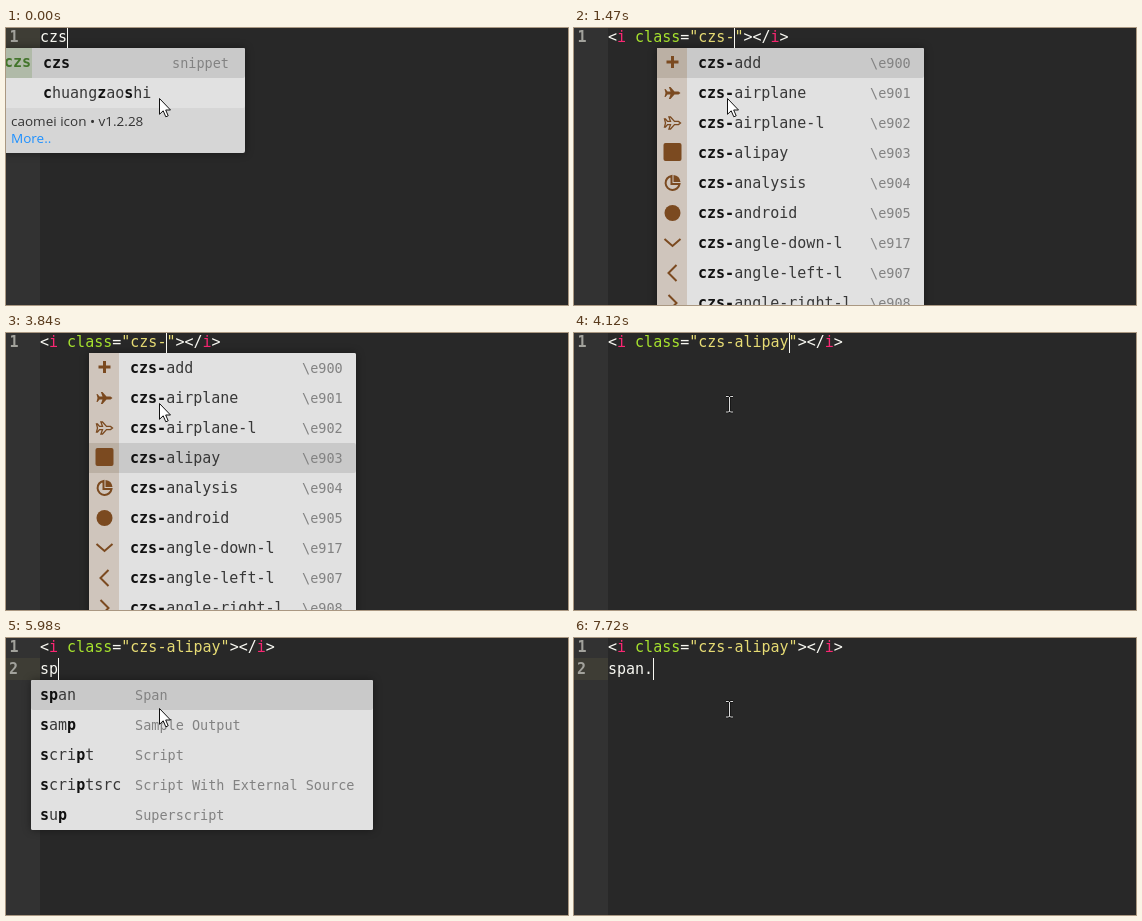
An HTML page that plays this animation: 562x277 px, repeating every 8000 ms.

```html
<!DOCTYPE html>
<html lang="en">
<head>
<meta charset="utf-8">
<title>Icon completion in an editor</title>
<style>
html, body { margin: 0; width: 100%; height: 100%; overflow: hidden; background: #282828; }
svg { display: block; width: 562px; height: 277px; }
text { font: 15px "DejaVu Sans Mono", monospace; white-space: pre; }
.hint { font-size: 13.5px; fill: #828282; }
.bold { font-weight: bold; }
.info { font: 13.5px "Open Sans", "Noto Sans", sans-serif; }
.box { filter: drop-shadow(0 0 4px rgba(0,0,0,.4)); }
</style>
</head>
<body>
<svg id="stage" viewBox="0 0 562 277"></svg>
<script>
const stage = document.getElementById('stage');
const LOOP = 8000, LEFT = 34, ADVANCE = 9.03;
const WHITE = '#f8f8f2', PINK = '#f92672', GREEN = '#a6e22e', YELLOW = '#e6db74', BROWN = '#7b4a20';

const esc = s => s.replace(/&/g, '&amp;').replace(/</g, '&lt;');
const rect = (x, y, w, h, fill, extra = '') =>
  `<rect x="${x}" y="${y}" width="${w}" height="${h}" fill="${fill}" ${extra}/>`;
const text = (x, y, s, fill, cls = '') => `<text x="${x}" y="${y}" fill="${fill}" class="${cls}">${s}</text>`;
const span = (s, fill) => `<tspan fill="${fill}">${esc(s)}</tspan>`;
const line = (d, w = 2) => `<path d="${d}" fill="none" stroke="${BROWN}" stroke-width="${w}"/>`;

const tag = cls => span('<', WHITE) + span('i', PINK) + span(' class', GREEN) + span('=', WHITE) +
  span(`"${cls}"`, YELLOW) + span('></', WHITE) + span('i', PINK) + span('>', WHITE);

// Label with the typed letters in bold
function label(word, typed) {
  let n = 0;
  return [...word].map(c => c === typed[n] ? (n++, `<tspan class="bold" fill="#111">${c}</tspan>`) : c).join('');
}

// Icons are centred on the origin
const plane = 'M8 0L6-1.6H2L-2-6H-3.6L-2-1.6H-5L-7-4H-8L-7 0L-8 4H-7L-5 1.6H-2L-3.6 6H-2L2 1.6H6Z';
const icons = [
  line('M-6-1H6M0-7V5', 3),
  `<path d="${plane}" fill="${BROWN}"/>`,
  line(plane, 1.3),
  rect(-9, -10, 18, 18, BROWN, 'rx="2"'),
  line('M-1-7A7 7 0 1 0 7 1H-1Z', 2) + `<path d="M1-8A8 8 0 0 1 8-1H1Z" fill="${BROWN}"/>`,
  `<circle r="8" fill="${BROWN}"/>`,
  line('M-8-4L0 3L8-4'),
  line('M4-8L-4 0L4 8'),
  line('M-4-8L4 0L-4 8')
];

function popup({ x, y, right, rows, typed, hintX, sel = 0, kind, info = 0 }) {
  const w = right - x, h = rows.length * 30;
  let out = `<g class="box">` + rect(x, y, w, h + info, info ? '#d6d6d6' : '#e1e1e1', 'rx="2"') + '</g>';
  out += rect(x, y, w, h, '#e1e1e1', 'rx="2"') + rect(x, y + sel * 30, w, 30, '#c9c9c9', 'rx="2"');
  if (kind === 'icon') out += rect(x, y, 30, h, '#cfc5bc') + rect(x, y + sel * 30, 30, 30, '#bbb0a4');
  if (kind === 'snippet') out += rect(x, y, 30, 30, '#b0baa8') + text(-2, y + 19, 'czs', '#43752b', 'bold');
  rows.forEach(([word, hint], i) => {
    const base = y + i * 30 + 20;
    if (kind === 'icon') out += `<g transform="translate(98.5 ${base - 5})">${icons[i]}</g>`;
    out += text(x + (kind ? 41 : 9), base, label(word, typed), '#383838') + text(hintX, base, hint, '#828282', 'hint');
  });
  return out;
}

const pairs = s => s.split('|').map(p => p.split(':'));
const prefix = {
  x: -4, y: 20, right: 239, typed: 'czs', hintX: 166, kind: 'snippet', info: 45,
  rows: [['czs', 'snippet'], ['chuangzaoshi', '']]
};
const iconRows = pairs('add:0|airplane:1|airplane-l:2|alipay:3|analysis:4|android:5|angle-down-l:17|angle-left-l:7|angle-right-l:8')
  .map(([name, n]) => ['czs-' + name, '\\e9' + n.padStart(2, '0')]);
const iconList = sel => ({ x: 83, y: 20, right: 350, rows: iconRows, typed: 'czs-', hintX: 296, kind: 'icon', sel });
const tagList = (typed, rows, right = 367, hintX = 129) => ({ x: 25, y: 42, right, rows: pairs(rows), typed, hintX });

const scripts = 'samp:Sample Output|script:Script|scriptsrc:Script With External Source|';
const manyTags = scripts + 'section:Section|select:Select|small:Small|source:Source|span:Span';
const someTags = 'span:Span|' + scripts + 'sup:Superscript';

const start = { first: span('czs', WHITE), col: 3, menu: prefix, lit: 1 };
const pick = sel => ({ first: tag('czs-'), col: 14, menu: iconList(sel) });
const done = { first: tag('czs-alipay'), col: 20 };
const second = (typed, menu) => ({ first: done.first, second: typed, col: typed.length, menu, lit: 1 });
const word = second('span', tagList('span', 'span:Span', 258, 84));
const dotted = second('span.');

// time, scene, caret shown
const steps = [
  [0, start, 1], [270, start, 0], [700, start, 1], [1070, start, 0],
  [1470, pick(0), 1], [1750, pick(0), 0], [2160, pick(0), 1], [2590, pick(0), 0], [3020, pick(0), 1],
  [3420, pick(1), 0], [3570, pick(2), 0], [3840, pick(3), 1],
  [4120, done, 1], [4530, done, 0], [4840, done, 1],
  [5270, second(''), 1], [5580, second(''), 0],
  [5860, second('s', tagList('s', manyTags)), 1],
  [5980, second('sp', tagList('sp', someTags)), 1],
  [6100, second('spa', tagList('spa', 'span:Span', 258, 84)), 1],
  [6220, word, 1], [6520, word, 0], [6890, word, 1],
  [7020, dotted, 1], [7290, dotted, 0], [7720, dotted, 1]
];

const arrow = '<path d="M153.5 70.5V86.3L157.2 82.8L159.8 88.8L162.2 87.8L159.7 82H164.5Z" fill="#fff" stroke="#111"/>';
const beamPath = 'M152 63.5H154.5L155.5 64.5L156.5 63.5H159M155.5 64V78.5M152 79H154.5L155.5 78L156.5 79H159';
const beam = `<path d="${beamPath}" fill="none" stroke="#111" stroke-width="2.4"/>` +
  `<path d="${beamPath}" fill="none" stroke="#ddd"/>`;

function draw([, s, caret]) {
  const below = s.second !== undefined, top = below ? 20 : -2;
  let out = rect(0, 0, 562, 277, '#282828') + rect(0, 0, LEFT, 277, '#323232');
  if (s.lit) out += rect(0, top, LEFT, 22, '#3e3d35');
  out += text(3.5, 14, '1', '#a2a29c', 'bold') + text(LEFT, 14, s.first, WHITE);
  if (below) out += text(3, 36, '2', '#a2a29c', 'bold') + text(LEFT, 36, s.second, WHITE);
  if (s.menu) out += popup(s.menu);
  if (s.menu === prefix)
    out += text(5, 98, 'caomei icon • v1.2.28', '#333', 'info') + text(5, 115, 'More..', '#1e90ff', 'info');
  if (caret) out += rect(Math.round(LEFT + s.col * ADVANCE), Math.max(top, 0), 1, below ? 22 : 20, WHITE);
  stage.innerHTML = out + (s.menu ? arrow : beam);
}

let shown;
function tick() {
  const t = performance.now() % LOOP;
  const step = steps.findLast(([at]) => at <= t);
  if (step !== shown) draw(shown = step);
  requestAnimationFrame(tick);
}
tick();
</script>
</body>
</html>
```
